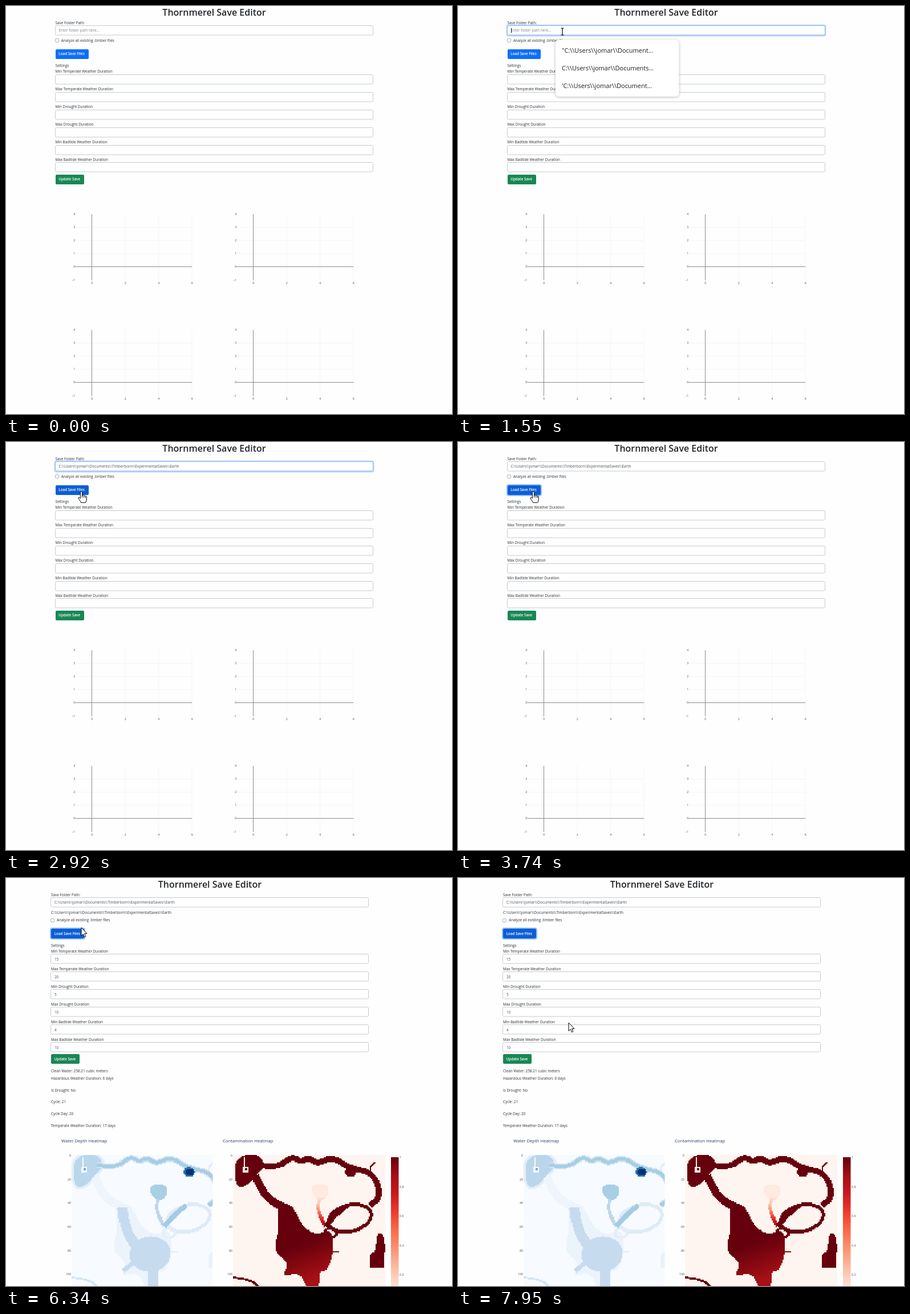
Write an HTML page with a canvas that moves like this. It is 782 px wide and 716 px high and loops after 8000 ms.

```html
<!DOCTYPE html>
<html lang="en">
<head>
<meta charset="utf-8">
<title>Save Editor</title>
<style>
html, body { margin: 0; width: 100%; height: 100%; overflow: hidden; background: #fefefe; }
canvas { display: block; }
</style>
</head>
<body>
<canvas id="stage" width="782" height="716"></canvas>
<script>
const ctx = document.getElementById('stage').getContext('2d');
const LOOP = 8000, LOADED = 6340, TICK = 70;
const FONT = '"Open Sans", "Noto Sans", sans-serif';
const FOLDER = String.raw`C:\\Users\\jomar\\Documents\\Timberborn\\ExperimentalSaves\\Earth`;
const SUGGESTIONS = [
  String.raw`"C:\\Users\\jomar\\Document...`,
  String.raw`C:\\Users\\jomar\\Documents...`,
  String.raw`'C:\\Users\\jomar\\Document...`
];
const DURATIONS = { 'Temperate Weather': [15, 20], 'Drought': [5, 10], 'Badtide Weather': [4, 10] };
const FIELDS = Object.entries(DURATIONS).flatMap(([name, [min, max]]) =>
  [[`Min ${name} Duration`, min], [`Max ${name} Duration`, max]]);
const STATS = ['Hazardous Weather Duration: 6 days', 'Is Drought: No', 'Cycle: 21', 'Cycle Day: 20',
  'Temperate Weather Duration: 17 days'];
const ramp = (t, start, length = 150) => Math.max(0, Math.min(1, (t - start) / length));

// ---- drawing helpers ----
function text(s, x, y, { size = 6.42, color = '#2c3135', align = 'left', weight = 400 } = {}) {
  ctx.font = `${weight} ${size}px ${FONT}`;
  ctx.fillStyle = color;
  ctx.textAlign = align;
  ctx.fillText(s, x, y + size * 0.34);
}
function line(x1, y1, x2, y2, color) {
  ctx.strokeStyle = color;
  ctx.lineWidth = 1;
  ctx.beginPath();
  ctx.moveTo(x1, y1);
  ctx.lineTo(x2, y2);
  ctx.stroke();
}
function box(x, y, w, h, r, fill, border, width = 1) {
  ctx.beginPath();
  ctx.roundRect(x, y, w, h, r);
  if (fill) { ctx.fillStyle = fill; ctx.fill(); }
  if (border) { ctx.strokeStyle = border; ctx.lineWidth = width; ctx.stroke(); }
}
function input(x, y, value, color, focus = 0) {
  const left = Math.floor(x) + 0.5, top = Math.floor(y) + 0.5;
  if (focus) box(left - 1, top - 1, 559, 19, 3, null, `rgba(13,110,253,${0.27 * focus})`, 2);
  box(left, top, 557, 16.5, 2, '#fff', '#c6cbd0');
  if (focus) box(left, top, 557, 16.5, 2, null, `rgba(134,183,254,${focus})`);
  text(value, x + 6, y + 8.7, { color });
}
function button(label, x, y, w, fill, focus = 0) {
  const left = Math.round(x), top = Math.round(y);
  if (focus) box(left - 1, top - 1, w + 2, 19, 3, null, `rgba(49,132,253,${0.5 * focus})`, 2);
  box(left, top, w, 17, 2, fill);
  text(label, x + 5.8, y + 8.6, { size: 6.25, color: '#fff', weight: 600 });
}

// ---- heat maps: smooth shapes sampled on a coarse grid ----
const CELL = 2.086, COLS = 128, ROWS = 111, MAP_X = 398, MAP_Y = 486;

// Smooth path guided by "x,y x,y ..." key points.
function curve(keys, closed = false) {
  let p = keys.split(' ').map(k => k.split(',').map(Number));
  if (closed) p = [...p, p[0], p[1]];
  const mid = i => [(p[i][0] + p[i + 1][0]) / 2, (p[i][1] + p[i + 1][1]) / 2];
  const path = new Path2D();
  path.moveTo(...(closed ? mid(0) : p[0]));
  for (let i = 1; i < p.length - 1; i++) path.quadraticCurveTo(...p[i], ...mid(i));
  if (!closed) path.lineTo(...p.at(-1));
  return path;
}
function oval(x, y, rx, ry, tilt = 0) {
  const path = new Path2D();
  path.ellipse(x, y, rx, ry, tilt, 0, 2 * Math.PI);
  return path;
}
function rects(...list) {
  const path = new Path2D();
  for (const r of list) path.rect(...r);
  return path;
}
const delta = curve('401,490 441,483 456,503 437,524 418,544 402,540', true);
const gate = rects([417, 490, 2, 16], [422, 490, 2, 16], [415, 506, 11, 11]);
const gateCore = rects([418, 509, 5, 5]);
const northRiver = curve('443,503 474,510 502,488 517,499 529,490 546,502 572,489 600,508 646,518 657,560 638,575');
const westRiver = curve('437,522 452,558 484,577');
const ring = oval(603, 597, 38, 23, -0.25);
const spill = curve('560,612 575,594 599,574');
const channel = curve('551,560 544,578 560,612');
const pond = curve('535,538 567,538 564,560 552,567 536,556', true);
const eddy = oval(569, 623, 11, 8);
const inlet = curve('566,656 584,656');
const basin = curve('474,572 503,572 515,606 543,628 570,614 576,650 564,690 549,690 550,722 527,722 517,692 482,700 498,676 468,656 480,615', true);
const arm = curve('487,578 491,618 522,660');
const pool = oval(536, 660, 36, 31, -0.15);
const outlet = curve('541,680 541,718');
const finger = curve('508,674 488,690');
const hill = curve('638,685 638,685 637,660 649,656 650,622 665,626 663,685 663,685', true);
const stream = curve('398,701 428,704 442,718');
const spur = curve('639,519 638,506 647,499');
const lake = oval(604, 516, 10, 8.5), lakeCore = oval(605, 516, 7, 6);

// Each layer is [shape, colour, stroke width]; no width means filled.
function heatmap(layers, finish) {
  const grid = document.createElement('canvas');
  grid.width = COLS;
  grid.height = ROWS;
  const g = grid.getContext('2d');
  for (const [path, color, width] of layers) {
    ctx.lineWidth = width || 1;
    g.fillStyle = color;
    for (let j = 0; j < ROWS; j++) for (let i = 0; i < COLS; i++) {
      const x = MAP_X + (i + 0.5) * CELL, y = MAP_Y + (j + 0.5) * CELL;
      if (width ? ctx.isPointInStroke(path, x, y) : ctx.isPointInPath(path, x, y)) g.fillRect(i, j, 1, 1);
    }
  }
  finish?.(g);
  return grid;
}
function gradient(g, x1, y1, x2, y2, colors) {
  const fill = g.createLinearGradient(x1, y1, x2, y2);
  colors.forEach((c, i) => fill.addColorStop(i / (colors.length - 1), c));
  return fill;
}
const PALE_BLUE = '#f7fbff', PALE_RED = '#fff5f0', DARK = '#67000d';
const REDS = [DARK, '#a50f15', '#cb181d', '#ef3b2c', '#fb6a4a', '#fc9272', '#fcbba1', '#fee0d2', PALE_RED];
const water = heatmap([
  [delta, '#e3eef8', 9], [westRiver, '#eef5fc', 15], [basin, '#ebf3fb'],
  [ring, '#deebf7', 6], [eddy, '#e3eef8', 4], [inlet, '#e3eef8', 4], [hill, '#e9f2fa'],
  [stream, '#d5e5f4', 4], [spur, '#deebf7', 3], [delta, '#bad6eb'],
  [northRiver, '#d3e4f3', 10], [northRiver, '#a6cee4', 6], [gate, PALE_BLUE], [gateCore, '#6baed6'],
  ...[[arm, 18], [pool], [outlet, 17], [finger, 8]].map(([path, width]) => [path, '#c7dbef', width]),
  [channel, '#bdd7ec', 6], [pond, '#a9cfe5'], [spill, '#a3cce3', 9], [lake, '#2171b5'], [lakeCore, '#08306b']
]);
const contamination = heatmap([
  ...[[delta], [northRiver, 10], [lake], [westRiver, 14], [ring, 6], [spill, 8], [eddy, 4], [inlet, 4],
    [basin], [hill], [stream, 4], [spur, 3], [channel, 6]].map(([path, width]) => [path, DARK, width]),
  [pond, '#feeae1'], [gate, PALE_RED], [gateCore, DARK]
], g => {
  g.globalCompositeOperation = 'source-atop';
  g.fillStyle = gradient(g, 42, 64, 59, 108, [DARK, DARK, '#850811', '#a81017']);
  g.fillRect(34, 62, 55, 49);
  g.fillStyle = gradient(g, 0, 36, 0, 62, ['#fee5d8', '#fcbba1', '#fb6a4a', '#cb181d', '#8a0812']);
  g.fillRect(69, 36, 8, 26);
});

const tickStyle = { size: 5.3, color: '#4c4c4c' };
function drawMap(title, x, width, background, grid) {
  text(title, x - 18, 461.5, { size: 7.7, color: '#2a3f5f' });
  ctx.save();
  ctx.beginPath();
  ctx.rect(x, MAP_Y, width, 230);
  ctx.clip();
  ctx.fillStyle = background;
  ctx.fillRect(x, MAP_Y, width, 230);
  ctx.imageSmoothingEnabled = false;
  ctx.drawImage(grid, x, MAP_Y, COLS * CELL, ROWS * CELL);
  ctx.restore();
  for (let v = 0; v <= 100; v += 20) text(v, x - 1, 487 + v * CELL, { ...tickStyle, align: 'right' });
}
function colorBar() {
  ctx.fillStyle = gradient(ctx, 0, 490, 0, 747.5, REDS);
  ctx.fillRect(675, 490, 13.5, 226);
  for (let i = 0; i < 5; i++) text(+(1 - i / 5).toFixed(1), 690, 490.5 + i * 51.5, tickStyle);
}
function emptyChart(x, y) {
  const zeroX = x + 30.2, top = y + 0.5, bottom = top + 116;
  for (let v = 0; v <= 6; v += 2) {
    const cx = zeroX + v * 29.25;
    if (v) line(cx, top, cx, bottom, '#f5f5f5');
    text(v, cx + 0.3, y + 121, { ...tickStyle, align: 'center' });
  }
  for (let v = -1; v <= 4; v++) {
    const cy = Math.round(y + (4 - v) * 23.1) + 0.5;
    if (v >= 0 && v < 4) line(x + 1, cy, x + 206, cy, v ? '#f5f5f5' : '#8c8c8c');
    text(v < 0 ? '−1' : v, x + 1, cy, { ...tickStyle, align: 'right' });
  }
  line(zeroX, top, zeroX, bottom, '#8c8c8c');
}

// ---- pointer: each leg is [start, end, x, y], walked in even ticks ----
const LEGS = [
  [400, 470, 227, 88], [660, 1010, 183, 45], [1810, 1880, 180, 104], [1950, 2030, 175, 52],
  [2300, 2920, 132, 87], [7330, 7600, 618, 170], [7670, 7950, 194, 254]
];
function pointerAt(t) {
  let x = 626, y = 576;
  for (const [start, end, toX, toY] of LEGS) {
    if (t < start) break;
    const steps = Math.round((end - start) / TICK);
    const done = Math.min(1, (Math.floor((t - start) * steps / (end - start)) + 1) / (steps + 1));
    x += (toX - x) * done;
    y += (toY - y) * done;
  }
  return { x, y };
}
const onLoadButton = p => p.x > 86 && p.x < 145 && p.y > 75 && p.y < 94;
const ARROW = new Path2D('M0 0V14.5L3.3 11.4 5.6 16.6 7.9 15.6 5.7 10.6H10Z');
const HAND = new Path2D('M-1.6 12V1.3A1.6 1.6 0 0 1 1.6 1.3V7Q3.5 5.6 4.6 7.4 6.5 6.2 7.4 8.2 9.3 7.4 9.3 9.5V14Q9 17 7.5 19.3H-.5Q-1.5 16.5-5 12.3-5.4 9.8-3.2 10.3ZM1.6 7V10.5M4.6 7.6V10.7M7.4 8.4V11');
const BEAM = new Path2D('M-2.5-6H2.5M0-6V6M-2.5 6H2.5');
function drawPointer(t, p) {
  const beam = t < LOADED && p.y > 35 && p.y < 64;
  const path = beam ? BEAM : t < 6270 && onLoadButton(p) ? HAND : ARROW;
  ctx.save();
  ctx.translate(p.x, p.y);
  ctx.lineWidth = beam ? 1.2 : 1;
  ctx.strokeStyle = '#000';
  ctx.fillStyle = '#fff';
  ctx.lineJoin = 'round';
  if (!beam) ctx.fill(path);
  ctx.stroke(path);
  ctx.restore();
}

function dropdown(t, p) {
  ctx.save();
  ctx.globalAlpha = ramp(t, 1340);
  ctx.shadowColor = 'rgba(0,0,0,.28)';
  ctx.shadowBlur = 5;
  ctx.shadowOffsetY = 1;
  box(171, 59, 216.5, 100, 6, '#fff');
  ctx.shadowColor = 'transparent';
  SUGGESTIONS.forEach((s, i) => {
    const y = 78.5 + i * 31;
    if (Math.abs(p.y - y) < 15.5) box(171, y - 15.5, 216.5, 31, 0, '#eee');
    text(s, 182, y, { size: 11, color: '#1f1f1f', weight: 500 });
  });
  ctx.restore();
}

function draw(t) {
  const loaded = t >= LOADED, filled = t >= 1880, p = pointerAt(t);
  const x = loaded ? 78.9 : 86.5, dy = loaded ? 13.7 : 0;
  ctx.fillStyle = '#fefefe';
  ctx.fillRect(0, 0, 782, 716);

  text('Thornmerel Save Editor', x + 278.5, 11.5, { size: 16, color: '#212529', weight: 600, align: 'center' });
  text('Save Folder Path:', x, 29.5);
  input(x, 34.5, filled ? FOLDER : 'Enter folder path here...', filled ? '#495057' : '#7c848b',
    ramp(t, 1280) - ramp(t, 3320));
  if ((t >= 1280 && t < 2030) || (t >= 2230 && t < 2740)) {
    const caret = Math.round(x + 6 + (filled ? ctx.measureText(FOLDER).width : 0)) + 0.5;
    line(caret, 39, caret, 47, '#000');
  }
  if (loaded) text(FOLDER, x, 60.5);
  box(Math.floor(x) + 0.5, Math.round(57 + dy) + 0.5, 6, 6, 1.5, '#fff', '#aeb3b8');
  text('Analyze all existing .timber files', x + 10.3, 60.5 + dy);

  const pressed = t >= 3320 && t < 3600;
  const blue = pressed ? '#0a58ca' : loaded || onLoadButton(p) ? '#0b5ed7' : '#0d6efd';
  button('Load Save Files', x, 75.7 + dy, 58, blue, ramp(t, 3320));

  text('Settings', x, 105 + dy);
  FIELDS.forEach(([label, value], i) => {
    const y = 115.2 + dy + i * 30.95;
    text(label, x, y);
    input(x, y + 5, loaded ? value : '', '#495057');
  });
  button('Update Save', x, 295.5 + dy, 50, '#198754');

  if (loaded) {
    text('Clean Water: 258.21 cubic meters', x, 338.5);
    STATS.forEach((s, i) => text(s, x, 352 + i * 20.6));
    drawMap('Water Depth Heatmap', MAP_X - 283, 247.5, PALE_BLUE, water);
    drawMap('Contamination Heatmap', MAP_X, 267, PALE_RED, contamination);
    colorBar();
  } else {
    for (const y of [365, 568]) for (const left of [120.3, 403.3]) emptyChart(left, y);
  }
  if (t >= 1340 && t < 1950) dropdown(t, p);
  if (t >= 330) drawPointer(t, p);
}

const began = performance.now();
function tick() {
  draw((performance.now() - began) % LOOP);
  requestAnimationFrame(tick);
}
tick();
</script>
</body>
</html>
```
